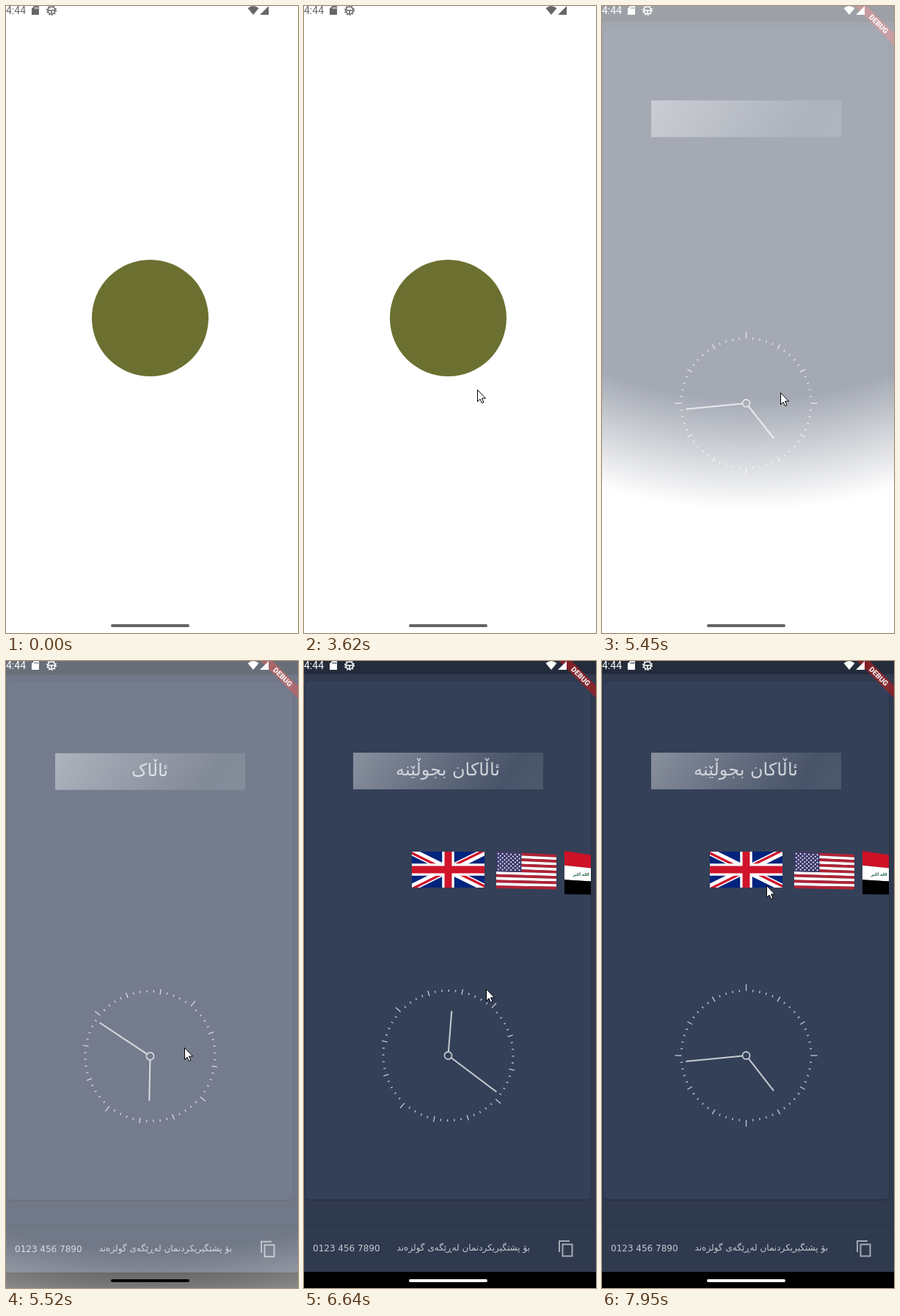
These frames come from a looping animation (398x855 px, 8000 ms). An HTML page:

```html
<!DOCTYPE html>
<html lang="ckb">
<head>
<meta charset="utf-8">
<title>Clock and flags</title>
<style>
  html, body { margin: 0; width: 100%; height: 100%; overflow: hidden; background: #fff; }
  #stage { position: fixed; inset: 0; overflow: hidden; }
  svg { position: absolute; left: 0; top: 0; width: 398px; height: 855px; overflow: hidden; }
  text { font-family: "DejaVu Sans", sans-serif; }
  .latin { font-family: Roboto, sans-serif; }
  #card { filter: drop-shadow(0 1px 1px rgba(0, 0, 0, .25)); }
  #dial { stroke: #c6cbd1; fill: none; }
</style>
</head>
<body>
<div id="stage">
<svg id="splash" viewBox="0 0 398 855">
  <circle cx="196.5" cy="425.5" r="79.5" fill="#6b7031"/>
</svg>

<svg id="app" viewBox="0 0 398 855">
  <defs>
    <linearGradient id="shine" x1="0" y1="0" x2="1" y2=".12">
      <stop offset="0" stop-color="#fff" stop-opacity=".42"/>
      <stop offset=".45" stop-color="#fff" stop-opacity=".25"/>
      <stop offset=".88" stop-color="#fff" stop-opacity=".1"/>
      <stop offset="1" stop-color="#fff" stop-opacity=".12"/>
    </linearGradient>
    <clipPath id="ukEdge"><path d="M0 0h60v30H0z"/></clipPath>
    <clipPath id="ukTurn"><path d="M30 15h30v15zv15H0zH0V0zV0h30z"/></clipPath>
    <clipPath id="cardEdge"><path d="M2 28h389v706H2z"/></clipPath>
  </defs>
  <g id="page">
    <path d="M0 0h398v855H0z" fill="#2f3a4f"/>
    <path d="M0-20h398v38H0z" fill="#242c3b"/>
    <rect id="card" x="2" y="28" width="389" height="706" rx="5" fill="#344058"/>
    <path d="M67 125h259v50H67z" fill="url(#shine)"/>
    <text id="title" x="196" y="156" font-size="24" fill="#d0d4d9" text-anchor="middle" direction="rtl"></text>

    <g id="flags" clip-path="url(#cardEdge)">
      <g transform="translate(147 260) scale(1.65 1.633)" clip-path="url(#ukEdge)" fill="none">
        <path d="M0 0h60v30H0z" fill="#00247d"/>
        <path d="M0 0l60 30M60 0L0 30" stroke="#fff" stroke-width="6"/>
        <path d="M0 0l60 30M60 0L0 30" stroke="#cf142b" stroke-width="4" clip-path="url(#ukTurn)"/>
        <path d="M30 0v30M0 15h60" stroke="#fff" stroke-width="10"/>
        <path d="M30 0v30M0 15h60" stroke="#cf142b" stroke-width="6"/>
      </g>
      <g id="us"></g>
      <g id="iraq"></g>
      <text x="377.500" y="293" font-size="5.500" font-weight="bold" fill="#17603a" text-anchor="middle"
            direction="rtl">الله أكبر</text>
    </g>

    <g id="dial"></g>

    <path d="M0 769h398" stroke="#2a3447"/>
    <g font-size="12" fill="#c3c8cf">
      <text x="12" y="805">0123 456 7890</text>
      <text x="308" y="804" direction="rtl" text-anchor="start">بۆ پشتگیریکردنمان لەڕێگەی گولزەند</text>
    </g>
    <path d="M348 806v-15h14M352.500 795.500h13v16h-13z" fill="none" stroke="#a2a9b3" stroke-width="2"/>
    <path d="M0 833h398v22H0z"/>
    <g transform="translate(398 0) rotate(45)">
      <path d="M-50 23.500H50v12H-50z" fill="#b71c1c" fill-opacity=".63"/>
      <text class="latin" y="33" font-size="10" font-weight="900" fill="#f3eeee" text-anchor="middle">DEBUG</text>
    </g>
  </g>
</svg>

<svg viewBox="0 0 398 855">
  <g id="status">
    <text class="latin" x="0" y="11" font-size="14">4:44</text>
    <path d="M38.500 0H45v12H35V3.500zM39 1.500v2.500h1V1.500zM41 1.500v2.500h1V1.500zM43 1.500v2.500h1V1.500z" fill-rule="evenodd"/>
    <g fill="none" stroke="currentColor" stroke-width="1.500">
      <circle cx="62" cy="6" r="5"/>
      <circle cx="62" cy="6" r="6.300" stroke-dasharray="1.800 2.150"/>
      <path d="M57 6h10M62 6v5"/>
    </g>
    <path d="M329.500 3Q337-3 344.500 3L337 12zM358 0v12h-12z"/>
  </g>
  <rect id="pill" x="143" y="843" width="107" height="4" rx="2"/>
  <path id="cursor" d="M.5.500v16l3.500-3.500 2.500 5.500 2.500-1-2.500-5.500h5z" fill="#fff" stroke="#000"/>
</svg>
</div>

<script>
const LOOP = 8000, OPEN = 5310, STEP = 2440 / 35;
const TITLE = "ئاڵاکان بجوڵێنە";
const $ = id => document.getElementById(id);
const clamp = v => Math.min(1, Math.max(0, v));

function add(parent, tag, attrs) {
  const el = document.createElementNS("http://www.w3.org/2000/svg", tag);
  for (const key in attrs) el.setAttribute(key, attrs[key]);
  return $(parent).appendChild(el);
}

// Maps the unit square to a quad with upright sides.
const panel = (x, w, top, topEnd, bottom, bottomEnd) => (u, v) => {
  const a = top + (topEnd - top) * u, b = bottom + (bottomEnd - bottom) * u;
  return [x + w * u, a + (b - a) * v];
};
function patch(parent, map, u0, v0, u1, v1, fill) {
  const points = [map(u0, v0), map(u1, v0), map(u1, v1), map(u0, v1)].join(" ");
  add(parent, "polygon", { points, fill });
}

function buildFlags() {
  const us = panel(262, 82, 260, 264, 310, 311.5);
  for (let i = 0; i < 13; i++) patch("us", us, 0, i / 13, 1, (i + 1) / 13, i % 2 ? "#fff" : "#b22234");
  patch("us", us, 0, 0, .42, 7 / 13, "#3c3b6e");
  for (let row = 0; row < 9; row++) {
    for (let col = row % 2; col < 11; col += 2) {
      const [cx, cy] = us(.42 * (col + 1) / 12, 7 / 13 * (row + 1) / 10);
      add("us", "circle", { cx, cy, r: 1, fill: "#fff" });
    }
  }
  const iraq = panel(355, 36, 259, 264.5, 318, 318.5);
  ["#ce1126", "#fff", "#000"].forEach((fill, i) => patch("iraq", iraq, 0, i / 3, 1, (i + 1) / 3, fill));
}

function buildDial() {
  const ray = (angle, from, to, width) => add("dial", "path", {
    d: `M0 ${-from}V${-to}`, "stroke-width": width, transform: `rotate(${angle})`
  });
  for (let i = 0; i < 60; i++) {
    if (i % 15 == 0) ray(i * 6, 88, 97, 1.3);
    else if (i % 5 == 0) ray(i * 6, 85, 92.5, 1.3);
    else ray(i * 6, 87, 90, 1.3);
  }
  ray(142, 5, 61, 2);
  ray(264.4, 5, 82.5, 2);
  add("dial", "circle", { r: 5, "stroke-width": 1.8 });
}

// Time, x, y of the pointer tip.
const route = [
  [460, 328, 826], [750, 201, 562], [945, 201, 562], [950, 200, 550], [1090, 228, 527],
  [1345, 228, 527], [1420, 236, 523], [3620, 236, 523], [4040, 243, 527], [6160, 243, 527],
  [6630, 248, 448], [7000, 246, 400], [7750, 225, 308], [7875, 225, 308], [7945, 222, 299], [LOOP, 222, 299]
];
function pointerAt(t) {
  const i = Math.max(1, route.findIndex(p => p[0] >= t));
  const [a, b] = [route[i - 1], route[i]], k = (t - a[0]) / (b[0] - a[0]);
  return [1, 2].map(n => Math.round(a[n] + (b[n] - a[n]) * k));
}

function draw(t) {
  const s = OPEN + Math.floor((t - OPEN) / STEP + .01) * STEP;
  const since = s - OPEN, open = since >= -1;

  $("splash").style.opacity = open ? clamp(.66 - since / 200) : 1;
  const app = $("app").style;
  app.visibility = since > 1 ? "visible" : "hidden";
  app.opacity = clamp((since - 9) / 293);
  const radius = Math.max(1, since * 690 / 140);
  app.maskImage = since < 250
    ? `radial-gradient(circle ${radius}px at 199px 0, #000 78%, transparent)` : "none";
  const lift = 15 * (1 - clamp(since / 275)) ** 2;
  $("page").setAttribute("transform", `translate(0 ${lift})`);

  $("status").style.color = $("status").style.fill = !open ? "#666" : since < 1 ? "#d0d0d0" : "#fff";
  $("pill").style.fill = since < 190 ? "#646464" : since < 900 ? "#050505" : "#fff";

  const letters = since < 150 ? 0 : Math.floor((since + 29) / 40);
  $("title").textContent = TITLE.slice(0, letters);
  $("flags").style.visibility = since >= 970 ? "inherit" : "hidden";
  const angle = since < 150 ? 0 : Math.min(360, (since + 29) * .1644);
  $("dial").setAttribute("transform", `translate(196.5 538) rotate(${angle})`);

  const [x, y] = pointerAt(Math.max(460, t < 1500 ? t : s + 1));
  $("cursor").style.visibility = t < 460 ? "hidden" : "visible";
  $("cursor").setAttribute("transform", `translate(${x} ${y})`);
}

buildFlags();
buildDial();
const start = performance.now();
function tick() {
  draw((performance.now() - start) % LOOP);
  requestAnimationFrame(tick);
}
tick();
</script>
</body>
</html>
```
